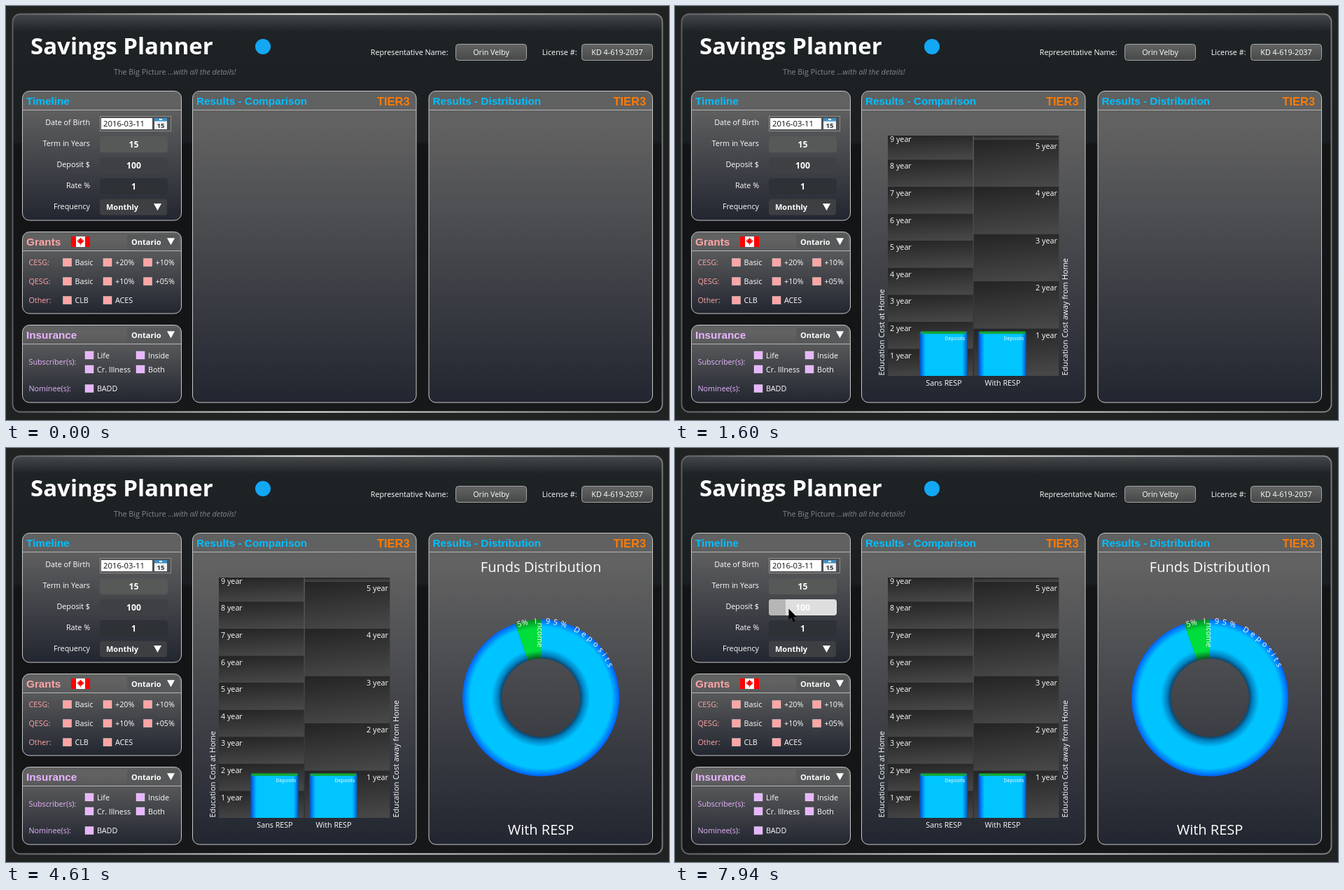
Recreate the animation shown at these times as an HTML page. Size 947 by 591 pixels, loop 8000 ms.

```html
<!DOCTYPE html>
<html lang="en">
<head>
<meta charset="utf-8">
<title>Savings Planner</title>
<style>
  html, body { margin: 0; width: 100%; height: 100%; overflow: hidden; background: #212222; }
  svg { display: block; width: 947px; height: 591px; font: 10.75px "Open Sans", "Noto Sans", sans-serif; fill: #fff; }
  text { white-space: pre; }
  .head { font: bold 15.3px "Liberation Sans", Arial, sans-serif; }
  .bold { font-weight: bold; }
  .end { text-anchor: end; }
  .mid { text-anchor: middle; }
  .big { font-size: 20px; }
</style>
</head>
<body>
<svg id="stage" viewBox="0 0 947 591">
  <defs>
    <linearGradient id="backdrop" x2="0" y2="1">
      <stop stop-color="#45494c"/><stop offset=".045" stop-color="#1e2326"/>
      <stop offset=".32" stop-color="#1a1e21"/><stop offset=".33" stop-color="#131416"/>
      <stop offset=".75" stop-color="#141517"/><stop offset="1" stop-color="#17181a"/>
    </linearGradient>
    <linearGradient id="rim">
      <stop stop-color="#616466"/><stop offset=".45" stop-color="#f0f0f0"/><stop offset="1" stop-color="#7c7f80"/>
    </linearGradient>
    <linearGradient id="panel" x2="0" y2="1">
      <stop stop-color="#5f6060"/><stop offset=".1" stop-color="#626262"/><stop offset="1" stop-color="#222630"/>
    </linearGradient>
    <linearGradient id="button" x2="0" y2="1">
      <stop stop-color="#626363"/><stop offset="1" stop-color="#474848"/>
    </linearGradient>
    <linearGradient id="band" x1=".4" x2=".6" y2="1">
      <stop stop-color="#262626"/><stop offset="1" stop-color="#474747"/>
    </linearGradient>
    <linearGradient id="bar">
      <stop stop-color="#12428c"/><stop offset=".05" stop-color="#0074f4"/><stop offset=".13" stop-color="#00c5ff"/>
      <stop offset=".89" stop-color="#00c5ff"/><stop offset=".96" stop-color="#0078ea"/><stop offset="1" stop-color="#144878"/>
    </linearGradient>
    <radialGradient id="blueRing" gradientUnits="userSpaceOnUse" cx="764" cy="356.5" r="112">
      <stop offset=".5" stop-color="#0a466e"/><stop offset=".55" stop-color="#0084c4"/><stop offset=".63" stop-color="#00c4ff"/>
      <stop offset=".9" stop-color="#00c4ff"/><stop offset="1" stop-color="#0060f8"/>
    </radialGradient>
    <radialGradient id="greenRing" gradientUnits="userSpaceOnUse" cx="764" cy="356.5" r="112">
      <stop offset=".5" stop-color="#0a5a24"/><stop offset=".6" stop-color="#00de3c"/>
      <stop offset=".88" stop-color="#00de3c"/><stop offset="1" stop-color="#068a24"/>
    </radialGradient>
    <path id="incomePath" d="M731.2 255.7A106 106 0 0 1 759 250.6V310"/>
    <path id="depositPath" d="M770.5 250.7A106 106 0 0 1 764 462.5"/>
  </defs>
</svg>
<script>
const LOOP = 8000;
const PINK = '#ffa5a5', LILAC = '#e8b5ff', CYAN = '#00bfff', ORANGE = '#ff7a00';
const stage = document.getElementById('stage');

const text = (x, y, s, cls = '', extra = '') => `<text x="${x}" y="${y}" class="${cls}" ${extra}>${s}</text>`;
const rect = (x, y, w, h, fill, extra = '') => `<rect x="${x}" y="${y}" width="${w}" height="${h}" fill="${fill}" ${extra}/>`;
const path = (d, fill, extra = '') => `<path d="${d}" fill="${fill}" ${extra}/>`;
const range = n => [...Array(n).keys()];

const panel = (x, y, w, h, title, color) =>
  rect(x, y, w, h, 'url(#panel)', 'rx="10" stroke="#c9c9c9"') +
  path(`M${x} ${y + 27}h${w}`, 'none', 'stroke="#b5b5b5"') +
  text(x + 5.5, y + 19.8, title, 'head', `fill="${color}"`);

const tier = x => text(x, 142, 'TIER3', 'head end', `fill="${ORANGE}" style="font-size:16.4px"`);
const triangle = (x, y) => path(`M${x} ${y}h11l-5.5 10z`, '#fff');
const select = (x, y, w, h, s, fill) =>
  rect(x, y, w, h, fill, 'rx="4"') +
  text(x + (w > 80 ? 9 : 6), y + h / 2 + 4.3, s, 'bold', 'font-size="11"') +
  triangle(x + w - (w > 80 ? 19 : 17), y + h / 2 - 5);
const check = (x, y, s, color) =>
  rect(x + .5, y - 9.5, 12, 11, color, 'stroke="#fff" stroke-opacity=".35"') + text(x + 17.5, y, s);
const field = (y, s, fill) => rect(134, y, 97, 23, fill, 'rx="4"') + text(182.5, y + 16.3, s, 'bold mid', 'font-size="12.2"');
const badge = (x, s) => rect(x, 54.5, 101, 23, 'url(#button)', 'rx="4" stroke="#a4a4a4"') + text(x + 50.5, 70, s, 'mid');

function header() {
  return rect(9.5, 11.5, 928, 568, 'url(#backdrop)', 'rx="11" stroke="url(#rim)" stroke-width="1.8"') +
    text(35, 69, 'Savings Planner', 'bold', 'font-size="33"') +
    '<circle cx="367" cy="58" r="11" fill="#12a8f4"/>' +
    text(154, 97.5, 'The Big Picture <tspan font-style="italic">...with all the details!</tspan>', '', 'fill="#85888a"') +
    text(631.5, 70, 'Representative Name:', 'end') + badge(642.5, 'Orin Velby') +
    text(815.5, 70, 'License #:', 'end') + badge(822.5, 'KD 4-619-2037');
}

function timeline() {
  const labels = ['Date of Birth', 'Term in Years', 'Deposit $', 'Rate %', 'Frequency'];
  return panel(23.5, 121.5, 227, 184.5, 'Timeline', CYAN) +
    labels.map((s, i) => text(120, 170 + i * 29.9, s, 'end')).join('') +
    rect(134.5, 157.5, 101, 21, '#505152', 'stroke="#8d8d8d"') +
    rect(136, 160, 73, 16, '#fff') + text(139, 172, '2016-03-11', '', 'fill="#111" font-size="11.3"') +
    rect(212, 160, 18, 16, '#eef1f3') + rect(212, 160, 18, 4.5, '#3b8fc4') + rect(219, 161, 4, 2, '#fff') +
    text(221, 174, '15', 'bold mid', 'fill="#333" font-size="9.5"') +
    field(186, '15', '#575858') + field(216, '100', '#3e4043') + field(246, '1', '#2e3135') +
    select(134, 275.5, 96, 23, 'Monthly', '#3d3f42');
}

function grants() {
  const rows = [['CESG:', 'Basic', '+20%', '+10%'], ['QESG:', 'Basic', '+10%', '+05%'], ['Other:', 'CLB', 'ACES']];
  return panel(23.5, 322.5, 227, 116.5, 'Grants', PINK) +
    rect(93, 329, 27, 15, '#fff') + rect(93, 329, 7, 15, '#f00') + rect(113, 329, 7, 15, '#f00') +
    path('M106.5 330.5l1.5 2.5 1.5-.5-.3 2.5 2.3-1-.8 2.5-3.4 3h-.5v2.5h-.6v-2.5h-.5l-3.4-3-.8-2.5 2.3 1-.3-2.5 1.5.5z', '#f00') +
    select(173, 326, 74, 20.5, 'Ontario', '#575859') +
    rows.map(([label, ...boxes], r) => text(32.5, 370 + r * 27, label, '', `fill="${PINK}"`) +
      boxes.map((s, i) => check(81 + i * 57.5, 370 + r * 27, s, PINK)).join('')).join('');
}

function insurance() {
  const tint = `fill="${LILAC}"`;
  return panel(23.5, 455.5, 227, 110.5, 'Insurance', LILAC) +
    select(173, 459, 74, 20.5, 'Ontario', '#575859') +
    text(32.5, 512, 'Subscriber(s):', '', tint) + text(32.5, 550, 'Nominee(s):', '', tint) +
    check(112.5, 502.5, 'Life', LILAC) + check(185.5, 502.5, 'Inside', LILAC) +
    check(112.5, 522.5, 'Cr. Illness', LILAC) + check(185.5, 522.5, 'Both', LILAC) +
    check(112.5, 550, 'BADD', LILAC);
}

// Stacked yearly costs, counted up from the base line and cut off at the top.
function costColumn(x, step, count, labelled, side) {
  return range(count).map(i => {
    const y = 528 - step * (i + 1), top = Math.max(y, 185);
    return rect(x, top, 121.5, y + step - top, 'url(#band)') +
      (i < labelled ? text(side ? x + 119 : x + 3, y + 13.2, `${i + 1} year`, side) : '');
  }).join('');
}

const bar = (x, label) =>
  rect(x, 465, 69, 63, 'url(#bar)') + rect(x + 2, 464.5, 65, 3.5, '#12a83a') +
  text(x + 65.5, 477, 'Deposits', 'end', 'font-size="7.2"') + text(x + 35, 542, label, 'mid');

const sideways = (x, s) => `<text transform="translate(${x} 527.5) rotate(-90)" font-size="11">${s}</text>`;

function comparison() {
  return costColumn(304, 38.6, 9, 9, '') + costColumn(426.8, 67.5, 6, 5, 'end') +
    bar(349, 'Sans RESP') + bar(433, 'With RESP') +
    sideways(299, 'Education Cost at Home') + sideways(560.5, 'Education Cost away from Home');
}

function ringSlice(from, to, fill) {
  const at = (r, turn) => `${764 + r * Math.sin(turn * 2 * Math.PI)} ${356.5 - r * Math.cos(turn * 2 * Math.PI)}`;
  const large = to - from > .5 ? 1 : 0;
  return path(`M${at(112, from)}A112 112 0 ${large} 1 ${at(112, to)}L${at(56, to)}A56 56 0 ${large} 0 ${at(56, from)}z`, fill);
}

function distribution() {
  const split = .947;
  return text(764, 177, 'Funds Distribution', 'mid big') + text(764, 551.5, 'With RESP', 'mid big') +
    ringSlice(0, split, 'url(#blueRing)') + ringSlice(split, 1, 'url(#greenRing)') +
    '<text font-size="11"><textPath href="#incomePath">5%<tspan dx="6"> Income</tspan></textPath></text>' +
    '<text font-size="11" letter-spacing="4.2"><textPath href="#depositPath">95% Deposits</textPath></text>';
}

const hover = rect(134, 216, 97, 23, '#dedede', 'rx="4"') +
  path('M158 216h-20q-4 0-4 4v15q0 4 4 4h20z', '#b6b6b6') + text(182.5, 232.3, '100', 'bold mid', 'font-size="12.2"');

stage.insertAdjacentHTML('beforeend', header() + timeline() + grants() + insurance() +
  panel(266.5, 121.5, 319.5, 444.5, 'Results - Comparison', CYAN) + tier(576.5) +
  panel(604, 121.5, 319.5, 444.5, 'Results - Distribution', CYAN) + tier(914) +
  `<g id="comparison">${comparison()}</g><g id="distribution">${distribution()}</g><g id="hover">${hover}</g>` +
  `<g id="resize">${path('M3 212l4-3v2.5h8V209l4 3-4 3v-2.5H7V215z', '#000')}</g>` +
  `<g id="arrow">${path('M0 0V16L3.7 12.6 6.3 18.5 8.9 17.4 6.4 11.7H11.3z', '#000')}</g>`);

const [comparisonEl, distributionEl, hoverEl, resizeEl, arrowEl] =
  ['comparison', 'distribution', 'hover', 'resize', 'arrow'].map(id => document.getElementById(id));

// Opacity rises in visible steps, the first one already faintly there.
function fade(t, start, interval, steps) {
  const k = Math.floor((t - start) / interval);
  return k < 0 ? 0 : Math.min(1, (k + 1.5) / (steps + .5));
}

function pointerX(t) {
  if (t >= 7940) return 162.5;
  if (t >= 7880) return 163.5;
  if (t >= 7630) return 165;
  const p = Math.min(1, Math.floor((t - 6460) / 78) / 10);
  return 11 + 155 * p * p * (3 - 2 * p);
}

function draw(t) {
  comparisonEl.setAttribute('opacity', fade(t, 1200, 80, 6));
  distributionEl.setAttribute('opacity', fade(t, 4140, 78, 7));

  const x = pointerX(t);
  const y = 212 + 17.5 * Math.min(1, (x - 11) / 150);
  resizeEl.setAttribute('opacity', t >= 6460 && t < 6538 ? 1 : 0);
  arrowEl.setAttribute('opacity', t >= 6538 ? 1 : 0);
  arrowEl.setAttribute('transform', `translate(${x} ${y})`);
  hoverEl.setAttribute('opacity', t >= 7320 ? 1 : t >= 7240 ? .7 : t >= 7160 ? .3 : 0);
}

const began = performance.now();
function tick() {
  draw((performance.now() - began) % LOOP);
  requestAnimationFrame(tick);
}
tick();
</script>
</body>
</html>
```
